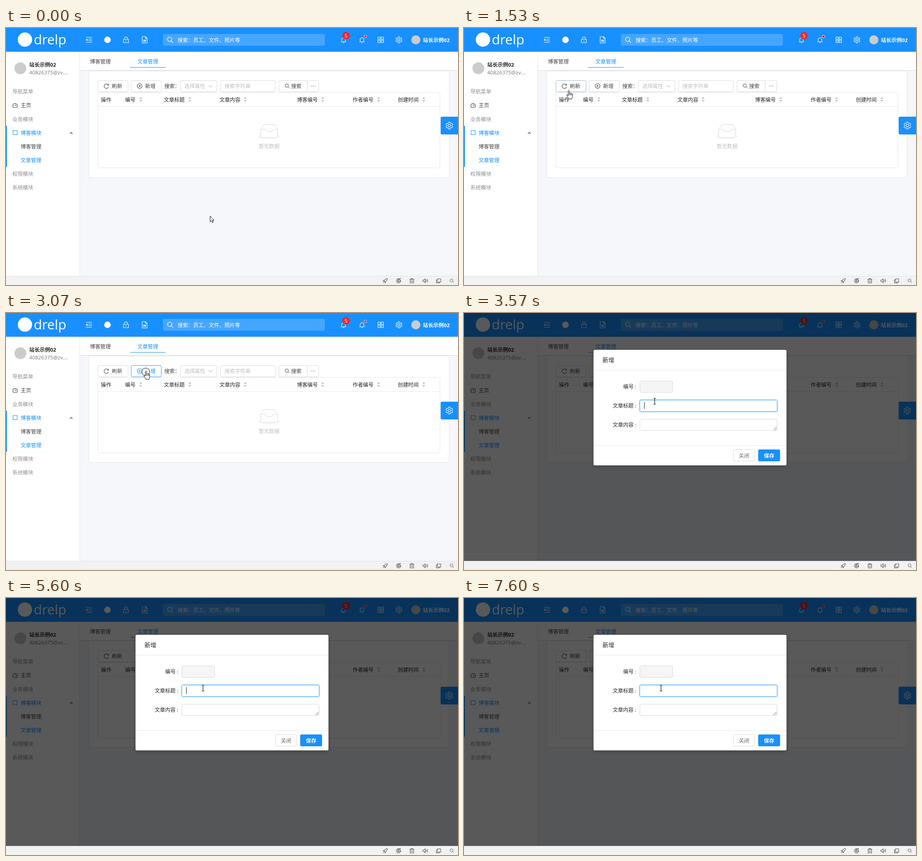
An HTML page for the animation above (8000 ms loop, 991 by 565 pixels).

```html
<!DOCTYPE html>
<html lang="zh-CN">
<head>
<meta charset="utf-8">
<title>文章管理</title>
<style>
  html, body { margin: 0; width: 100%; height: 100%; overflow: hidden; background: #f5f7fb; }
  svg { display: block; }
  text { font: 11.45px "Open Sans", "Noto Sans CJK SC", "Noto Sans CJK", sans-serif; white-space: pre; }
  .bold { font-weight: 700; }
  .line { fill: none; stroke: currentColor; stroke-width: 1.1; }
</style>
</head>
<body>
<svg id="stage" width="991" height="565" viewBox="0 0 991 565">
  <defs>
    <filter id="shade" x="-10%" y="-10%" width="120%" height="130%">
      <feDropShadow dx="0" dy="3" stdDeviation="5" flood-opacity=".2"/>
    </filter>
    <linearGradient id="fade" x2="0" y2="1">
      <stop stop-opacity=".14"/><stop offset="1" stop-opacity="0"/>
    </linearGradient>
  </defs>
</svg>
<script>
const BLUE = '#1890ff', INK = '#444', DARK = '#262626', GREY = '#8f8f8f', PALE = '#bfbfbf', EDGE = '#d9d9d9', RULE = '#e8e8e8';

// cy is the middle of the line of text
const text = (x, cy, s, fill = INK, attrs = '') =>
  `<text x="${x}" y="${cy + 4.2}" fill="${fill}" ${attrs}>${s}</text>`;
const rect = (x, y, w, h, fill, attrs = '') =>
  `<rect x="${x}" y="${y}" width="${w}" height="${h}" fill="${fill}" ${attrs}/>`;
const box = (x, y, w, h, stroke = EDGE, fill = '#fff', r = 3) =>
  rect(x + .5, y + .5, w - 1, h - 1, fill, `stroke="${stroke}" rx="${r}"`);
const dot = (x, y, r, fill, attrs = '') =>
  `<circle cx="${x}" cy="${y}" r="${r}" fill="${fill}" ${attrs}/>`;
const group = (body, attrs = '') => `<g ${attrs}>${body}</g>`;

const ring = (x, y, r) => `<circle cx="${x}" cy="${y}" r="${r}"/>`;
const path = d => `<path d="${d}"/>`;

function gear(r) {
  let d = '';
  for (let i = 0; i < 48; i++) {
    const a = i * Math.PI / 24;
    const k = r * (.86 + .14 * Math.tanh(2.5 * Math.cos(6 * a)));
    d += (i ? 'L' : 'M') + (k * Math.sin(a)).toFixed(2) + ' ' + (k * Math.cos(a)).toFixed(2);
  }
  return path(d + 'Z') + ring(0, 0, r * .36);
}

// Icons are drawn around their own centre
const icons = {
  fold: path('M-6.5-5.5H6.5M-1.5-1.8H6.5M-1.5 1.8H6.5M-6.5 5.5H6.5M-4-2L-6.3 0L-4 2Z'),
  lock: path('M-5.5-1H5.5V6.3H-5.5ZM-3.2-1V-4Q-3.2-6.5 0-6.5T3.2-4V-1M0 1.6V4'),
  doc: path('M-5.5-7H2L5.5-3.5V7H-5.5ZM1.7-7V-3.2H5.5M-3-.8L-1.7 4L0 .2L1.7 4L3-.8'),
  search: ring(-1, -1, 4.1) + path('M2 2L5.5 5.5'),
  bell: path('M-6 4H6M-4.3 4V-.8Q-4.3-5 0-5T4.3-.8V4M0-5V-6.7M-1.6 5Q0 7.6 1.6 5'),
  grid: [[-6, -6], [1, -6], [-6, 1], [1, 1]].map(([x, y]) => path(`M${x} ${y}h5v5h-5z`)).join(''),
  gear: gear(7),
  bigGear: gear(8),
  dash: path('M-3.6 4.3A5.2 5.2 0 1 1 3.6 4.3ZM0 .8L2.3-1.7M-3.3.5h1M0-3.3v1M2.5.5h1'),
  reload: path('M4.3-2.8A5 5 0 1 0 4.8 1.6M4.7-5V-2.3H2'),
  plus: ring(0, 0, 5.2) + path('M-2.6 0H2.6M0-2.6V2.6'),
  down: path('M-4-2L0 2.4L4-2'),
  up: path('M-2.7 1.4L0-1.4L2.7 1.4'),
  rocket: path('M5-5Q0-5-3 1L-1 3Q5 0 5-5ZM-2-1L-5 0L-3 1M1 2L0 5L-1 3M-3 3L-5 5'),
  speed: path('M4.5-2A5 5 0 1 1 1.5-4.7M5-5.5L-2 1.5Q-3-4 5-5.5M-1.5 2.5Q3 3 4-1'),
  bin: path('M-5-3.5H5M-4-3.5V5H4V-3.5M-1.7-3.5V-5H1.7V-3.5M-1.5-1V3M1.5-1V3'),
  sound: path('M-5.5-1.7H-3L0-4.5V4.5L-3 1.7H-5.5ZM2-2Q3.5 0 2 2M4-4Q7 0 4 4'),
  tabs: path('M-2.5-4.5H5V3H-2.5ZM-2.5-2H-5V5H2.5V3'),
};
const icon = (name, x, y, color, scale = 1) =>
  group(icons[name], `class="line" color="${color}" transform="translate(${x} ${y}) scale(${scale})"`);

const header =
  rect(0, 52, 991, 3, 'url(#fade)') +
  rect(0, 0, 991, 52, BLUE) +
  dot(41.5, 25.5, 15.7, '#fff') +
  text(61, 31.5, 'drelp', '#fff', 'style="font-size:29.3px"') +
  icon('fold', 182, 26, '#fff') +
  dot(222.5, 26, 7.2, '#fff') +
  icon('lock', 263, 26, '#fff') +
  icon('doc', 304, 26, '#fff') +
  rect(344, 13, 355, 26, 'rgba(255,255,255,.2)', 'rx="3"') +
  icon('search', 360, 26, '#fff', 1.15) +
  text(376, 26.5, '搜索：员工、文件、照片等', '#fff') +
  icon('bell', 740, 26.5, '#fff', .95) +
  dot(745.5, 17, 8.2, '#f5222d') +
  text(745.5, 17, '5', '#fff', 'text-anchor="middle"') +
  icon('bell', 780.5, 26.5, '#fff', .95) +
  dot(788, 18.5, 3, '#f5222d', 'stroke="#fff" stroke-width=".8"') +
  icon('grid', 821.5, 26, '#fff') +
  icon('gear', 861.5, 26, '#fff') +
  dot(898.5, 26, 10, '#ccc') +
  text(914, 26.5, '站长示例02', '#fff', 'class="bold"');

const menu = [
  [14, 140, '导航菜单', GREY], [32.3, 170, '主页', INK], [14, 200.5, '业务模块', GREY],
  [32, 230.5, '博客模块', BLUE], [32, 260.5, '博客管理', INK], [32, 290.5, '文章管理', BLUE],
  [14, 320.5, '权限模块', GREY], [14, 350.5, '系统模块', GREY],
];
const sidebar =
  rect(0, 52, 161, 494, '#fff') + rect(161, 54, 1, 492, RULE) +
  dot(31.5, 88.5, 13, '#ccc') +
  text(51, 80.5, '站长示例02', DARK, 'class="bold"') +
  text(51, 97.5, '40826375@zv....', '#777') +
  menu.map(m => text(...m)).join('') +
  icon('dash', 20, 170.5, INK) +
  rect(15.5, 225.5, 9, 9, 'none', `stroke="${BLUE}"`) +
  icon('up', 143, 231, DARK) +
  rect(0, 215, 2, 90, BLUE);

const sorter = x => `<path d="M${x - 3.3} 155.7h6.6l-3.3-4zM${x - 3.3} 158.5h6.6l-3.3 4z" fill="${PALE}"/>`;
const columns = [
  [208, '操作'], [261, '编号', 295.5], [346, '文章标题', 403], [468, '文章内容', 524.5],
  [638, '博客编号', 694.5], [760, '作者编号', 817], [859, '创建时间', 916],
];
const empty =
  `<ellipse cx="577" cy="238.5" rx="24" ry="5" fill="#f5f5f5"/>` +
  `<path d="M558.5 223L565 212.5H589L595.5 223V239Q595.5 241 593.5 241H560.5Q558.5 241 558.5 239Z
    M558.5 223H568Q569.5 223 569.5 225T572 227.5H582Q584.5 227.5 584.5 225T586 223H595.5" fill="#fff" stroke="${EDGE}"/>` +
  text(554, 259.5, '暂无数据', PALE);

const page =
  rect(162, 52, 829, 41, '#fff') + rect(162, 93, 829, 1, EDGE) +
  text(184, 74, '博客管理') + text(288, 74, '文章管理', BLUE) + rect(272, 86, 78, 1, BLUE) +
  box(181, 94, 791, 235, RULE, '#fff', 0) +
  group(box(201, 115, 67, 26) + icon('reload', 220, 128, INK) + text(232, 128, '刷新'), 'id="reload"') +
  group('', 'id="add"') +
  text(347, 128, '搜索：') +
  box(382, 115, 81, 26) + text(391, 128, '选择属性', PALE) + icon('down', 448.5, 127.5, PALE) +
  box(470, 115, 121, 26) + text(479, 128, '搜索字符串', PALE) +
  box(598, 115, 63, 26) + icon('search', 616.5, 127.5, INK, .9) + text(625, 128, '搜索') +
  box(660, 115, 26, 26) + [669.5, 673.2, 677].map(x => dot(x, 127.5, .8, INK)).join('') +
  box(201, 141, 751, 167, RULE) + rect(202, 172, 749, 1, RULE) +
  columns.map(([x, s, sx]) => text(x, 157.5, s, DARK) + (sx ? sorter(sx) : '')).join('') +
  empty +
  rect(953, 195, 42, 39, BLUE, 'rx="3"') + icon('bigGear', 972, 214.5, '#fff');

const label = (x, y, s) => text(x, y, s, DARK) + text(374.5, y, ':', DARK);
const modal = group(
  rect(0, 0, 991, 546, 'rgba(0,0,0,.65)') +
  rect(284, 81, 423, 254, '#fff', 'rx="3" filter="url(#shade)"') +
  rect(284, 125, 423, 1, RULE) + rect(284, 291, 423, 1, RULE) +
  text(303.5, 103.5, '新增', '#262626', 'style="font-size:13px"') +
  label(349, 161.5, '编号') + box(385, 149, 73, 26, EDGE, '#f5f5f5') +
  label(326, 204, '文章标题') +
  rect(384, 190, 304, 28, 'none', 'rx="4" stroke="rgba(24,144,255,.2)" stroke-width="2"') +
  box(385, 191, 302, 26, '#40a9ff') +
  label(326, 246, '文章内容') + box(385, 233, 302, 26) +
  `<path d="M678.5 257.5L685.5 250.5M682.5 257.5L685.5 254.5" stroke="#666"/>` +
  box(590, 300, 48, 26) + text(602.5, 313.5, '关闭', '#666') +
  rect(645, 300, 48, 26, BLUE, 'rx="3"') + text(657.5, 313.5, '保存', '#fff', 'class="bold"') +
  text(395, 203.5, 'ce', INK, 'id="typed"') +
  rect(395, 196, 1, 15, '#222', 'id="caret"'), 'id="modal"');

const taskbar = rect(0, 546, 991, 19, '#f2f2f2') + rect(0, 545, 991, 1, '#e2e2e2') +
  ['rocket', 'speed', 'bin', 'sound', 'tabs', 'search'].map((n, i) =>
    icon(n, 831.5 + 29.2 * i, 555.7, '#555', i === 5 ? .8 : .95)).join('');

// Pointers have their hot spot at 0,0
const pointers =
  group('<path d="M.5.5V13L3.4 10.3L5.5 15L7.5 14.1L5.4 9.6H9.3Z" fill="#fff" stroke="#111"/>', 'id="arrow"') +
  group(dot(-.7, 2.5, 8.5, '#fff', 'stroke="#111" id="press"') +
    `<path d="M-1.5 12V1.6Q-1.5.5-.2.5T1.2 1.6V7Q1.2 6 2.5 6T3.8 7.2Q4 6.5 5 6.6T6.2 8Q6.5 7.3 7.2 7.5T8 9V13.5
      Q8 15.5 6.5 17.5V19H-.5V17.5Q-2 16-4.5 11.5Q-5 10-4 9.5T-1.5 12Z" fill="#fff" stroke="#111" stroke-linejoin="round"/>
     <path d="M1.2 7V11M3.8 8V11M6.2 8.5V11" stroke="#111"/>`, 'id="hand"') +
  group('<path d="M-2.5-6.5H-.8L0-6L.8-6.5H2.5M-2.5 6.5H-.8L0 6L.8 6.5H2.5M0-6V6" fill="none" stroke="#111" stroke-width="1.2"/>', 'id="beam"');

const stage = document.getElementById('stage');
stage.insertAdjacentHTML('beforeend', page + sidebar + header + modal + taskbar + pointers);
const $ = id => document.getElementById(id);

// start ms, pointer, x, y, extras
const steps = [
  [0, 'arrow', 447, 413],
  [500, 'arrow', 44, 117],
  [1030, 'arrow', 55, 116],
  [1530, 'hand', 230, 137, { over: 'reload' }],
  [2050, 'arrow', 31, 309],
  [2550, 'arrow', 238, 226],
  [3070, 'hand', 307, 127, { over: 'add' }],
  [3570, 'beam', 418, 194, { modal: true, caret: 395 }],
  [4070, 'beam', 432, 198, { modal: true }],
  [4600, 'beam', 432, 198, { modal: true, caret: 395 }],
  [5100, 'beam', 432, 198, { modal: true }],
  [5600, 'beam', 432, 198, { modal: true, caret: 395 }],
  [6100, 'beam', 432, 198, { modal: true, caret: 406, typed: true }],
  [6600, 'beam', 432, 198, { modal: true }],
  [7100, 'beam', 432, 198, { modal: true, caret: 395 }],
  [7600, 'beam', 432, 198, { modal: true }],
];
const LOOP = 8000;
const show = (id, on) => $(id).setAttribute('visibility', on ? 'inherit' : 'hidden');

function draw([, pointer, x, y, extras = {}]) {
  for (const id of ['arrow', 'hand', 'beam']) show(id, id === pointer);
  $(pointer).setAttribute('transform', `translate(${x} ${y})`);
  const adding = extras.over === 'add';
  const tint = adding ? BLUE : INK;
  $('add').innerHTML = box(274, 115, 67, 26, adding ? '#2e9cf8' : EDGE) +
    icon('plus', 293, 127.5, tint) + text(305, 128, '新增', tint);
  show('press', adding && pointer === 'hand');
  $('reload').firstChild.setAttribute('stroke', extras.over === 'reload' ? '#a3b8c8' : EDGE);
  show('modal', extras.modal);
  show('typed', extras.typed);
  show('caret', extras.caret);
  if (extras.caret) $('caret').setAttribute('x', extras.caret);
}

let current;
function tick() {
  const t = performance.now() % LOOP;
  const step = steps.findLast(s => s[0] <= t);
  if (step !== current) draw(current = step);
  requestAnimationFrame(tick);
}
tick();
</script>
</body>
</html>
```
